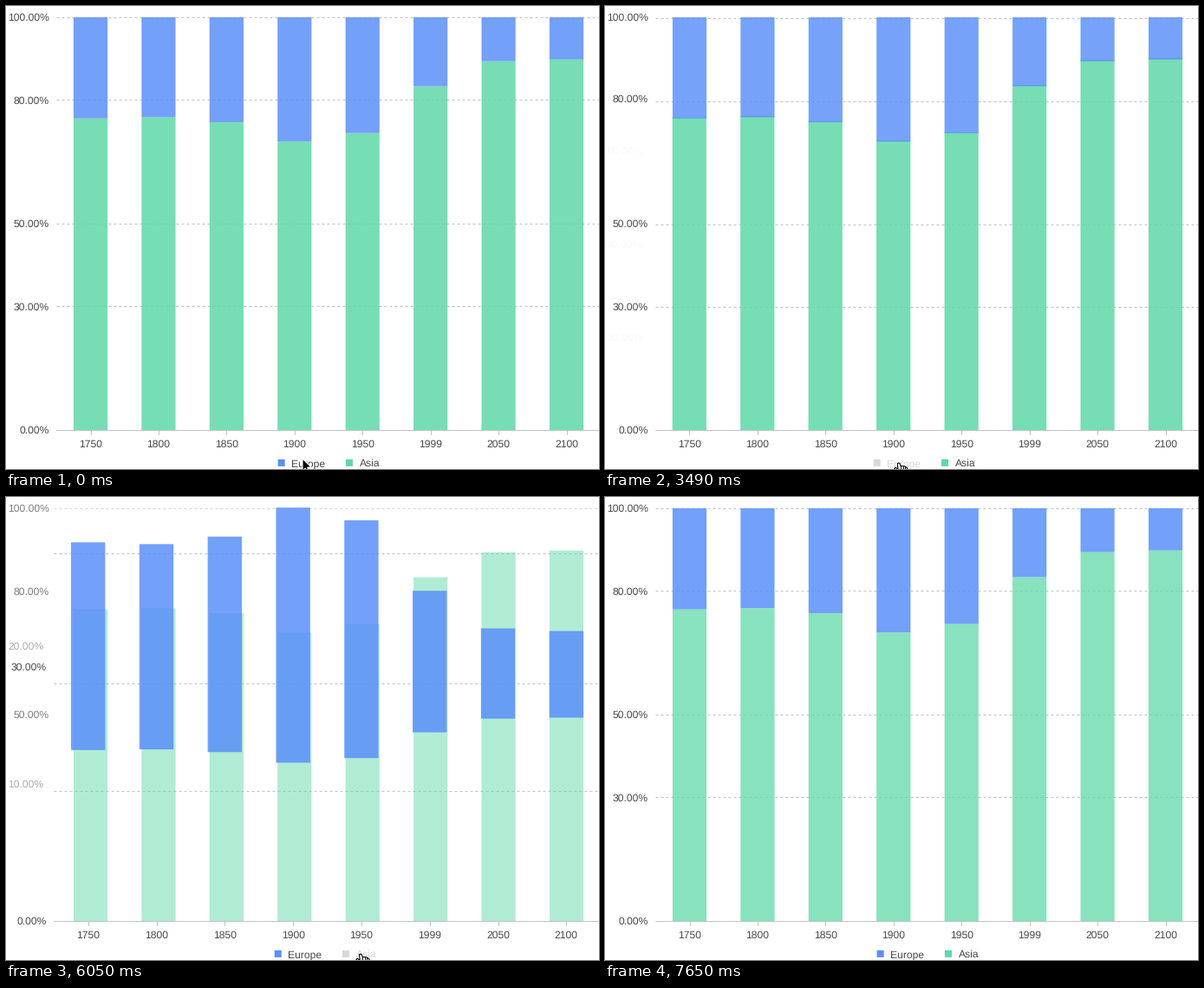
Write a matplotlib script that moves like this. It is 684 by 534 pixels and loops after 8560 ms.

```python
import numpy as np
import matplotlib.pyplot as plt
from matplotlib.animation import FuncAnimation
from matplotlib.patches import Polygon, Rectangle

W, H, LOOP, TICK = 684, 534, 8560, 20
TOP, BASE, RIGHT = 13, 489, 685.75
REFRESH = 80
BLUE, GREEN, OFF = "#5B8FF9", "#5ED8A7", "#D8D8D8"
RULE, INK = "#C2C2C2", "#484848"
FILL, HOVER, RELEASE = 0.85, 0.69, 0.74

YEARS = (1750, 1800, 1850, 1900, 1950, 1999, 2050, 2100)
ASIA = np.array([502, 635, 809, 947, 1402, 3634, 5268, 7268])
EUROPE = np.array([163, 203, 276, 408, 547, 729, 628, 828])
SHARE = {"Europe": 100 * EUROPE / (ASIA + EUROPE),
         "Asia": 100 * ASIA / (ASIA + EUROPE)}


def layout(shown, ticks, peak, top=TOP):
    """Plot geometry: the value `peak` reaches the height `top`."""
    left = 58.3 if max(ticks) >= 100 else 51.7
    mid, band = left, (RIGHT - left) / len(YEARS)
    mid = left + band * (np.arange(len(YEARS)) + .5)
    return dict(shown=shown, ticks=ticks, left=left, mid=mid,
                width=band / 2, unit=(BASE - top) / peak)


LAYOUTS = {
    "both": layout(("Europe", "Asia"), (0, 30, 50, 80, 100), 100),
    "asia": layout(("Asia",), range(0, 100, 20), SHARE["Asia"].max(), 7),
    "europe": layout(("Europe",), range(0, 40, 10), 30),
}

# Legend clicks: first visible time, time already elapsed then, new layout
CLICKS = [(1480, 80, "asia"), (2550, 20, "both"), (3490, 50, "asia"),
          (4490, 57, "both"), (5860, 30, "europe"), (6860, 20, "both")]

# Pointer path: time, x, y
PATH = np.array([(0, 342, 522), (150, 371, 524), (490, 371, 524),
                 (800, 337, 525), (940, 338.5, 527), (4880, 339, 527),
                 (5360, 409, 527), (7260, 409, 527), (7500, 414, 534)])
ARROW = np.array([(0, 0), (0, 14), (3.2, 11), (5.3, 16), (7.6, 15),
                  (5.6, 10.2), (10, 10)])
HAND = np.array([(-1.5, .6), (0, 0), (1.3, .8), (2.2, 3.6), (7, 3.8),
                 (10, 6), (8, 14), (0, 14), (-5, 6.5), (-4, 5.2), (-.9, 7)])

plt.rcParams.update({"font.family": "Liberation Sans", "font.size": 12.1,
                     "text.hinting": "none"})
fig = plt.figure(figsize=(W / 72, H / 72), dpi=72, facecolor="white")
ax = fig.add_axes([0, 0, 1, 1])
ax.set_xlim(0, W)
ax.set_ylim(H, 0)
ax.axis("off")


def mix(a, b, p):
    return a + (b - a) * p


def ease_in_out(u):
    return 2 * u * u if u < .5 else 1 - 2 * (1 - u) ** 2


def hold(t, start=0):
    return start + (t - start) // REFRESH * REFRESH


def rule(z, **kw):
    return ax.plot([], [], color=RULE, lw=1, snap=True, zorder=z, **kw)[0]


def label(text, align, y=0):
    return ax.text(0, y, text, ha=align, va="baseline", color=INK, zorder=5)


def box(color, z, y=0, size=0):
    patch = Rectangle((0, y), size, size, fc=color, lw=0, zorder=z, snap=False)
    return ax.add_patch(patch)


def cursor(points, face, edge):
    return ax.add_patch(Polygon(points, fc=face, ec=edge, lw=1.1, zorder=8))


grid = [rule(1, dashes=(3, 3)) for _ in range(4)]
axis_line = rule(4)
ticks = [rule(4) for _ in YEARS]
years = [label(str(y), "center", 509.3) for y in YEARS]
values = sorted({v for s in LAYOUTS.values() for v in s["ticks"]})
percents = {v: label(f"{v:.2f}%", "right") for v in values}
bars = {"Europe": [box(BLUE, 3) for _ in YEARS],
        "Asia": [box(GREEN, 2) for _ in YEARS]}
legend = {name: (x, color, box(color, 5, 522.8, 8.1),
                 label(name, "left", 531.2))
          for name, x, color in (("Europe", 313.6, BLUE),
                                 ("Asia", 391.9, GREEN))}
arrow = cursor(ARROW, "black", "white")
hand = cursor(HAND, "white", "black")
knuckles = [ax.plot([], [], color="black", lw=.9, zorder=9)[0]
            for _ in range(3)]


def transition(t):
    """Old layout, new layout, eased progress, fade-out progress."""
    old = new = "both"
    dt = LOOP
    for seen, lead, name in CLICKS:
        if t >= seen:
            old, new = new, name
            dt = lead + hold(t, seen) - seen
    return (LAYOUTS[old], LAYOUTS[new], ease_in_out(min(1, dt / 400)),
            min(1, dt / 350) ** 2)


def bar_boxes(name, s):
    """Rows of x, width, top and bottom for one series."""
    zero = 0 * s["mid"]
    below = SHARE["Asia"] if name == "Europe" and "Asia" in s["shown"] else zero
    return np.array([s["mid"] - s["width"] / 2, zero + s["width"],
                     BASE - s["unit"] * (below + SHARE[name]),
                     BASE - s["unit"] * below])


def opacity(name, t):
    if name == "Europe":
        return HOVER if 940 <= t < 2500 else FILL
    if t >= 7650:
        return RELEASE
    return HOVER if 5580 <= t < 6800 or t >= 7300 else FILL


def draw_bars(t, old, new, p, gone):
    for name, patches in bars.items():
        alpha = opacity(name, t)
        if name not in new["shown"]:
            shape = bar_boxes(name, old)
            alpha *= 1 - gone
        elif name in old["shown"]:
            shape = mix(bar_boxes(name, old), bar_boxes(name, new), p)
        else:
            shape = bar_boxes(name, new)
            shape[2] = mix(shape[3], shape[2], mix(.01, 1, p))
        for patch, (x, w, top, low) in zip(patches, shape.T):
            patch.set_bounds(x, top, w, low - top)
            patch.set_alpha(alpha)
    for patch in bars["Asia"]:  # a series that returns is stacked on top
        patch.set_zorder(3.5 if t >= CLICKS[-1][0] else 2)


def draw_axes(old, new, p, gone):
    left = mix(old["left"], new["left"], p)
    axis_line.set_data([left, W], [BASE, BASE])
    for x, tick, text in zip(mix(old["mid"], new["mid"], p), ticks, years):
        tick.set_data([x, x], [BASE, BASE + 5])
        text.set_x(x)

    def place(key, before, after, height):
        """Height and opacity of a part that moves, enters or leaves."""
        a = old if before else new
        b = new if after else old
        alpha = 1 if before and after else p if after else 1 - gone
        return (mix(a["left"], b["left"], p),
                mix(height(a, key), height(b, key), p),
                alpha if before or after else 0)

    def value_height(s, v):
        return BASE - s["unit"] * v

    def line_height(s, i):
        return value_height(s, s["ticks"][i]) if i < len(s["ticks"]) else 0

    for i, line in enumerate(grid, 1):
        _, y, alpha = place(i, i < len(old["ticks"]), i < len(new["ticks"]),
                            line_height)
        line.set_data([left, W], [y, y])
        line.set_alpha(alpha)

    for v, text in percents.items():
        x, y, alpha = place(v, v in old["ticks"], v in new["ticks"],
                            value_height)
        text.set_position((x - 8.4, y + 4.3))
        text.set_alpha(alpha)


def draw_legend(new):
    shift = 0 if len(new["shown"]) == 2 else -3.9
    for name, (x, color, marker, text) in legend.items():
        on = name in new["shown"]
        marker.set_x(x + shift)
        marker.set_facecolor(color if on else OFF)
        text.set_x(x + shift + 15.6)
        text.set_color(INK if on else OFF)


def draw_pointer(t):
    t = hold(t)
    x, y = (np.interp(t, PATH[:, 0], PATH[:, k]) for k in (1, 2))
    inside = t < PATH[-1, 0] - REFRESH / 2
    pointing = t >= 900 and not 370 < x < 390
    arrow.set_visible(inside and not pointing)
    hand.set_visible(inside and pointing)
    arrow.set_xy(ARROW + (x, y))
    hand.set_xy(HAND + (x, y))
    for k, line in enumerate(knuckles):
        line.set_visible(inside and pointing)
        line.set_data([x + 2.3 + 2.5 * k] * 2, [y + 4, y + 7.5])


def update(i):
    t = i * TICK + TICK / 2
    old, new, p, gone = transition(t)
    draw_bars(t, old, new, p, gone)
    draw_axes(old, new, p, gone)
    draw_legend(new)
    draw_pointer(t)
    return []


anim = FuncAnimation(fig, update, frames=LOOP // TICK, interval=TICK,
                     init_func=lambda: update(0), repeat=True, repeat_delay=0)
plt.show()
```
